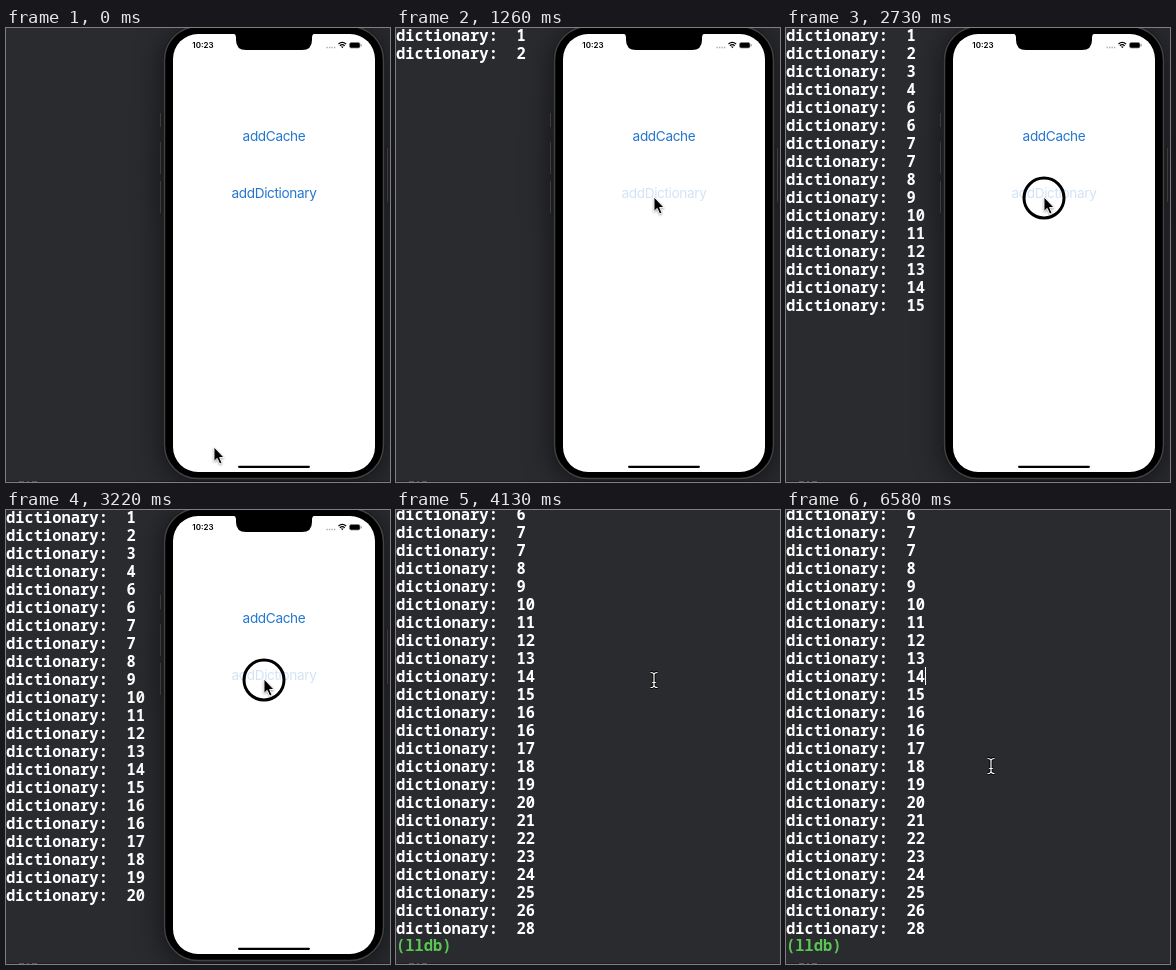
An HTML page for the animation above (7000 ms loop, 384 by 454 pixels).

```html
<!DOCTYPE html>
<html lang="en">
<head>
<meta charset="utf-8">
<title>Console race demo</title>
<style>
  html, body { margin: 0; width: 100%; height: 100%; overflow: hidden; background: #2a2b2f; }
  svg { display: block; }
  .log { font: 800 15.45px "Noto Sans Mono", monospace; fill: #fff; }
  .log text { white-space: pre; }
  .ui { font-family: Inter, sans-serif; text-anchor: middle; }
  .button { font-size: 13.6px; letter-spacing: -.35px; fill: #2476cf; }
  #phone { filter: drop-shadow(0 4px 14px rgba(0, 0, 0, .55)); }
</style>
</head>
<body>
<svg width="384" height="454" viewBox="0 0 384 454">
  <rect width="384" height="454" fill="#2a2b2f"/>
  <g id="log" class="log"></g>
  <text id="prompt" class="log" x="0" y="441" style="fill:#5ac653">(lldb)</text>
  <path d="M0 453.5H384" stroke="#211e24"/>
  <path d="M13 453.5h5m3 0h2m3 0h5" stroke="#55525a"/>
  <rect id="caret" x="139" y="157" width="1" height="18" fill="#fff"/>

  <g id="phone">
    <path d="M156 85v14m0 15v32m0 7v32M380 120v54" stroke="#1c1c1e" stroke-width="4"/>
    <path d="M154.5 85v14m0 15v32m0 7v32M381.5 120v54" stroke="#3c3c3f"/>
    <rect x="157" y="-3" width="222" height="455" rx="35" fill="#19191b"/>
    <rect x="158.5" y="-1.5" width="219" height="452" rx="33.5" stroke="#424245" stroke-width="1.5"/>
    <rect x="167" y="6" width="202" height="438" rx="25" fill="#fff"/>
    <path d="M226 5.5q4 0 4 4v2.5q0 10 10 10h56q10 0 10-10v-2.5q0-4 4-4z"/>
    <text class="ui" x="197" y="20.3" font-size="8" font-weight="600">10:23</text>
    <path d="M320.5 19.5h9" stroke="#aaa" stroke-width="1.3" stroke-dasharray="1.3 1.2"/>
    <path d="M332.5 16q3.8-3.2 7.6 0M333.9 17.7q2.4-2 4.8 0" fill="none" stroke="#000" stroke-width="1.3"/>
    <path d="M334.9 18.5h2.8l-1.4 1.7z"/>
    <rect x="343.5" y="14.5" width="10.5" height="5.5" rx="1.7" stroke="#888" stroke-width=".7"/>
    <path d="M355.2 16.3v2" stroke="#888"/>
    <text class="ui button" x="268" y="113">addCache</text>
    <text class="ui button" id="target" x="268" y="170">addDictionary</text>
    <rect x="232" y="437.7" width="72" height="2.3" rx="1.15"/>
  </g>

  <circle id="ring" cx="258" cy="170" fill="none" stroke="#000" stroke-width="3"/>
  <path id="arrow" d="M0 0V14.3L3.2 11.4L5.7 17L8 16L5.6 10.5H10Z" stroke="#fff" stroke-width=".9"
        style="filter:drop-shadow(0 1px 1px rgba(0,0,0,.35))"/>
  <g id="beam" fill="none">
    <path id="beamShape" d="M-3.5-7.5Q0-7.5 0-5Q0-7.5 3.5-7.5M0-5.5V5.5M-3.5 7.5Q0 7.5 0 5Q0 7.5 3.5 7.5M-1.8 2.5H1.8"
          stroke="#000" stroke-width="3"/>
    <path d="M-3.5-7.5Q0-7.5 0-5Q0-7.5 3.5-7.5M0-5.5V5.5M-3.5 7.5Q0 7.5 0 5Q0 7.5 3.5 7.5M-1.8 2.5H1.8"
          stroke="#fff" stroke-width="1.2"/>
  </g>
</svg>
<script>
const LOOP = 7000, STEP = 70, LINE = 18;
const el = id => document.getElementById(id);
const show = (id, on) => el(id).style.display = on ? '' : 'none';
const place = (id, [x, y]) => el(id).setAttribute('transform', `translate(${x} ${y})`);
const clamp = v => Math.max(0, Math.min(1, v));
const smooth = v => (v = clamp(v)) * v * (3 - 2 * v);
const mix = (a, b, k) => a + (b - a) * k;

// Two racing threads: each tap logs two values, some of them twice or never.
const values = [1, 2, 3, 4, 6, 6, 7, 7, 8, 9, 10, 11, 12, 13, 14, 15, 16, 16,
  17, 18, 19, 20, 21, 22, 23, 24, 25, 26, 28];
const taps = [1260, 1470, 1680, 1890, 2170, 2310, 2450, 2660, 2870, 3010, 3150, 3290, 3430, 3640];
const CRASH = 3850, HIDE = 3920;
const sweep = [[258, 170], [298, 110], [250, 52], [150, 80], [103, 160], [130, 240], [170, 263], [205, 256]];

el('log').innerHTML = values.map((v, i) =>
  `<text y="${13 + i * LINE}">dictionary:  ${v}</text>`).join('');
const rows = [...el('log').children];

// Catmull-Rom curve through the points, k in 0..1
function along(points, k) {
  const pos = clamp(k) * (points.length - 1);
  const i = Math.min(Math.floor(pos), points.length - 2), u = pos - i;
  const at = j => points[Math.max(0, Math.min(points.length - 1, j))];
  return [0, 1].map(d => {
    const [a, b, c, e] = [-1, 0, 1, 2].map(o => at(i + o)[d]);
    return b + u / 2 * (c - a + u * (2 * a - 5 * b + 4 * c - e + u * (3 * (b - c) + e - a)));
  });
}

function ringVisible(t) {
  if (t >= HIDE) return t >= 4200 && t < 4340;
  if (t < taps[0]) return t >= 1050 && t < 1190;
  const last = taps.filter(p => p <= t).pop();
  return t < CRASH && t - last >= (last === taps[0] ? 140 : 70);
}

function draw(t) {
  const count = t >= CRASH ? values.length : 2 * taps.filter(p => p <= t).length;
  rows.forEach((row, i) => row.style.display = i < count ? '' : 'none');
  place('log', [0, -Math.max(0, (count - 1) * LINE - 411)]);

  const hidden = t >= HIDE;
  show('phone', !hidden);
  show('prompt', t >= HIDE + STEP);
  el('target').style.opacity = mix(1, .2, clamp((t - 910) / 140));

  show('ring', ringVisible(t));
  el('ring').setAttribute('r', hidden ? 16.5 : 20);

  const k = smooth(t / 770);
  show('arrow', !hidden);
  place('arrow', [mix(208, 258, k), mix(419, 175, k) - 6 * smooth((t - 770) / 280)]);
  show('beam', hidden);
  place('beam', along(sweep, (t - 5110) / 630));

  show('caret', t >= 4200 && t < 4830 || t >= 5425 && t < 6020 || t >= 6580);
}

function tick() {
  const t = performance.now() % LOOP;
  draw(Math.floor(t / STEP) * STEP);
  requestAnimationFrame(tick);
}
tick();
</script>
</body>
</html>
```
